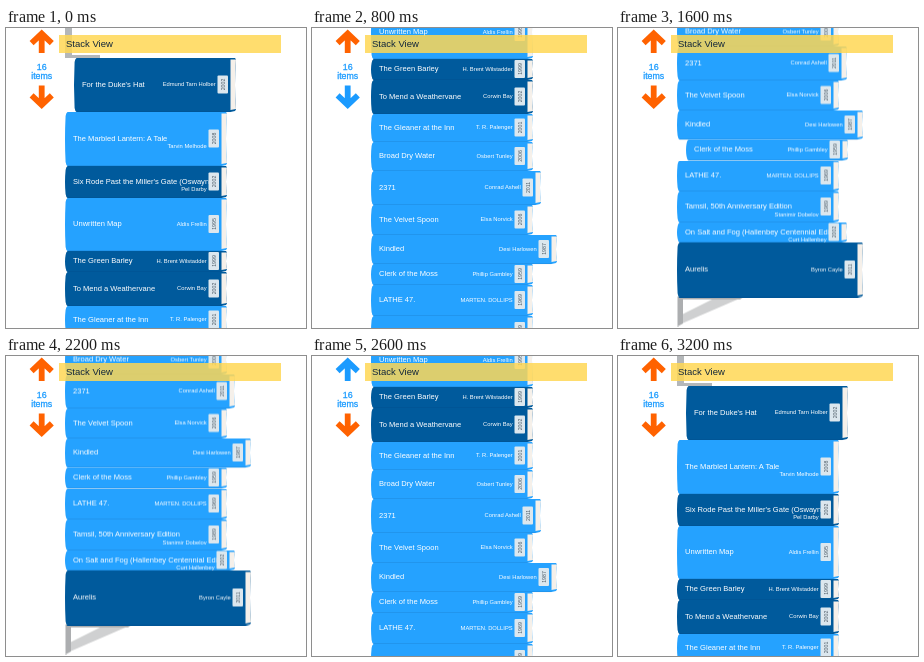
Write an HTML page that moves like this. It is 300x300 px and loops after 3.4 s.

```html
<!DOCTYPE html>
<html lang="en">
<head>
<meta charset="utf-8">
<title>Stack View</title>
<style>
html, body { margin: 0; width: 100%; height: 100%; overflow: hidden; background: #fff; }
svg { display: block; font-family: "Liberation Sans", Arial, sans-serif; }
#stage { width: 100vw; height: 100vh; }
.title { font-size: 7.55px; fill: #fff; }
.author { font-size: 5.8px; fill: #fff; text-anchor: end; }
.year { font-size: 5.2px; fill: #4c5a65; text-anchor: middle; }
.count { font-size: 8.8px; fill: #1b9bff; stroke: #1b9bff; stroke-width: .3; text-anchor: middle; }
.arrow { fill: none; stroke: #ff6200; stroke-width: 5.8; }
#stack { animation: scroll 3.4s step-end infinite; }
#up { animation: up 3.4s step-end infinite; }
#down { animation: down 3.4s step-end infinite; }
.out { transform: translateX(9px); }
.peek { animation: peek 3.4s step-end infinite; }
@keyframes scroll {
  0% { transform: translateY(0); }
  5.8824% { transform: translateY(-42px); }
  23.5294% { transform: translateY(-192px); }
  29.4118% { transform: translateY(-256px); }
  35.2941% { transform: translateY(-316.5px); }
  70.5882% { transform: translateY(-256px); }
  76.4706% { transform: translateY(-192px); }
  82.3529% { transform: translateY(-42px); }
  94.1176%, 100% { transform: translateY(0); }
}
@keyframes down {
  0% { stroke: #ff6200; }
  5.8824% { stroke: #1b9bff; }
  35.2941%, 100% { stroke: #ff6200; }
}
@keyframes up {
  0% { stroke: #ff6200; }
  70.5882% { stroke: #1b9bff; }
  94.1176%, 100% { stroke: #ff6200; }
}
@keyframes peek {
  0% { transform: translateX(0); }
  47.0588% { transform: translateX(9px); }
  64.7059%, 100% { transform: translateX(0); }
}
</style>
</head>
<body>
<svg id="stage" viewBox="0 0 300 300">
  <g id="stack">
    <path fill="#b4b7b9" d="M59 0H66V27H94V30H59Z"/>
    <path fill="#cfd0d1" d="M64 603L98 586H124L64 612Z"/>
    <path fill="#acaeb0" d="M59.5 585H126L122 588H65V612L59.5 615Z"/>
    <g id="books"></g>
  </g>
  <rect x="53" y="7" width="222" height="18" fill="#ffd753" fill-opacity=".84"/>
  <text x="60" y="19.1" font-size="9.5" fill="#12263a">Stack View</text>
  <path id="up" class="arrow" d="M25.6 15.2L35.7 5.6L45.8 15.2M35.7 7V25"/>
  <path id="down" class="arrow" d="M25.6 67.3L35.7 76.9L45.8 67.3M35.7 75.5V57.5"/>
  <text class="count" x="35.7" y="41.7">16</text>
  <text class="count" x="35.7" y="50.5">items</text>
</svg>
<script>
const LEFT = 59, TOP = 30;
const DARK = '#005a9c', LIGHT = '#25a2ff';

// title, author, year, thickness, right edge, options: d dark, w author on its own line
const books = [
  ["For the Duke's Hat", 'Edmund Tarn Holber', 2002, 54, 221, 'd', 'out'],
  ['The Marbled Lantern: A Tale', 'Tarvin Melhode', 2008, 54, 221, 'w'],
  ["Six Rode Past the Miller's Gate (Oswayne Classics)", 'Pel Darby', 2002, 32, 221, 'dw'],
  ['Unwritten Map', 'Aldis Frellin', 1995, 53, 221, ''],
  ['The Green Barley', 'H. Brent Wilstadder', 1999, 21, 221, 'd'],
  ['To Mend a Weathervane', 'Corwin Bay', 2002, 34, 221, 'd'],
  ['The Gleaner at the Inn', 'T. R. Palenger', 2001, 28, 221, ''],
  ['Broad Dry Water', 'Osbert Tunley', 2006, 29, 221, ''],
  ['2371', 'Conrad Ashell', 2011, 34, 229, ''],
  ['The Velvet Spoon', 'Elsa Norvick', 2006, 30, 221, ''],
  ['Kindled', 'Desi Harlowen', 1987, 29, 245, ''],
  ['Clerk of the Moss', 'Phillip Gambley', 1959, 21, 221, '', 'peek'],
  ['LATHE 47.', 'MARTEN. DOLLIPS', 1969, 31, 221, ''],
  ['Tamsil, 50th Anniversary Edition', 'Stanimir Dobelov', 1989, 31, 221, 'w'],
  ['On Salt and Fog (Hallenbey Centennial Edition)', 'Curt Hallenbey', 2002, 20, 229, 'w'],
  ['Aurelis', 'Byron Cayle', 2011, 55, 245, 'd']
];

function drawBook([title, author, year, h, right, opts, cls = ''], y) {
  const color = opts.includes('d') ? DARK : LIGHT;
  const end = right - 5.5, low = y + h, mid = y + h / 2;
  const label = right - 18.5;
  const authorY = mid + (opts.includes('w') ? 9 : 1.3);
  return `<g class="${cls}">
    <path fill="${color}" d="M${LEFT + 2.5} ${y}H${right - 1}L${right} ${y + 1.5}Q${right - 2} ${mid} ${right} ${low - 2.5}L${right - 1} ${low - 1}L${end} ${low}H${LEFT + 2.5}Q${LEFT + 1} ${low - 1} ${LEFT + .6} ${low - 4}Q${LEFT - .6} ${mid} ${LEFT + .6} ${y + 4}Q${LEFT + 1} ${y + 1} ${LEFT + 2.5} ${y}Z"/>
    <path fill="#f5f0ea" d="M${end} ${y + 1.5}H${right}Q${right - 2} ${mid} ${right} ${low - 3}L${end} ${low - 2}Z"/>
    <path fill="none" stroke="#003a68" stroke-opacity=".25" stroke-width=".6" d="M${LEFT + 2.5} ${low - .3}H${end}"/>
    <svg x="67" y="${y}" width="${label - 67}" height="${h}"><text class="title" x="0" y="${h / 2 + 1.9}">${title}</text></svg>
    <text class="author" x="${right - 20.3}" y="${authorY}">${author}</text>
    <rect x="${label}" y="${mid - 9.5}" width="10.5" height="18" rx="1" fill="#dce7ee"/>
    <text class="year" transform="translate(${label + 7.1} ${mid - .5}) rotate(-90)">${year}</text>
  </g>`;
}

let y = TOP;
document.getElementById('books').innerHTML = books.map(book => {
  const part = drawBook(book, y);
  y += book[3];
  return part;
}).join('');
</script>
</body>
</html>
```
